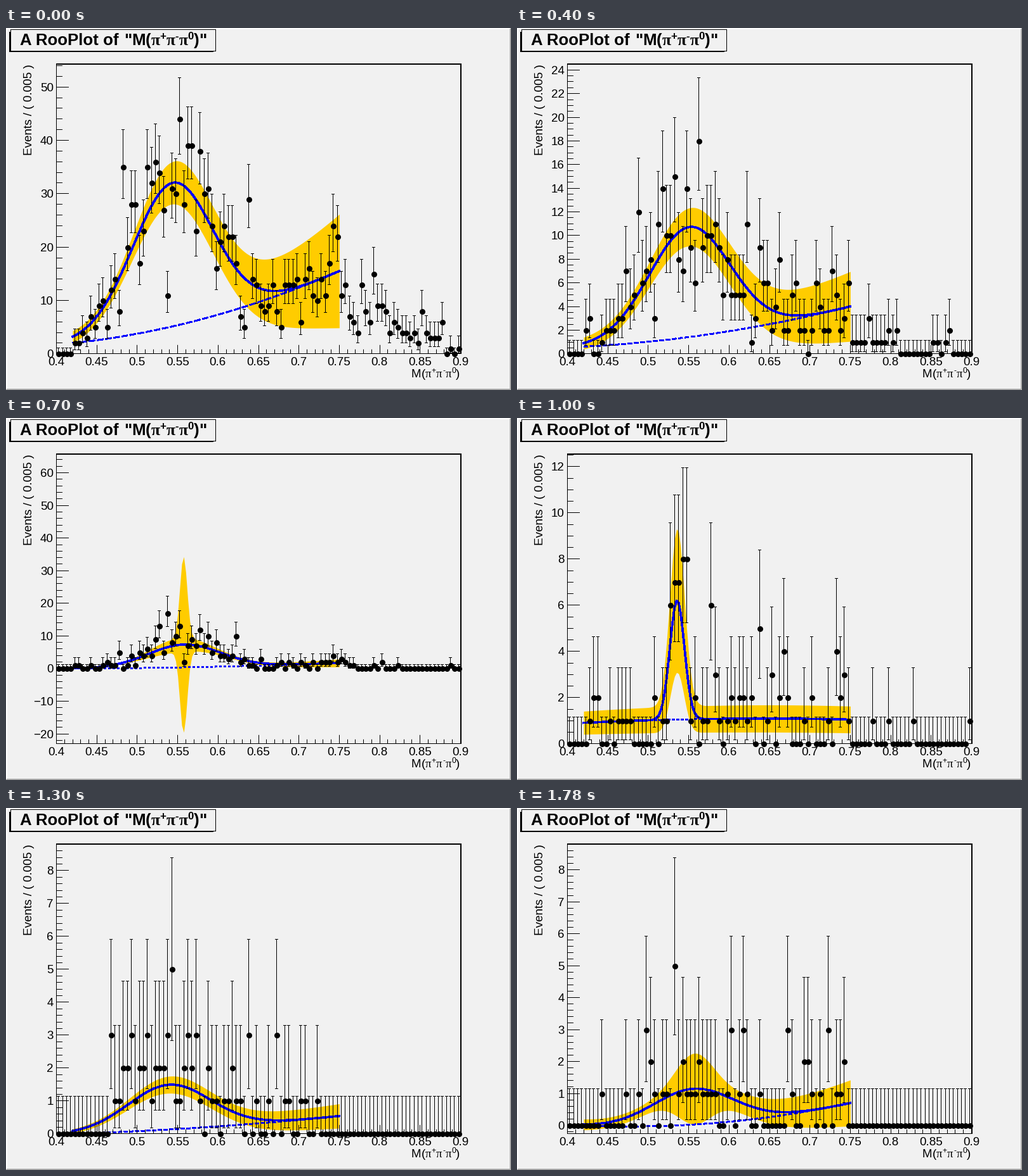
These frames come from a looping animation (796x572 px, 1900 ms). A matplotlib script:

```python
import math

import matplotlib.pyplot as plt
import numpy as np
from matplotlib.animation import FuncAnimation
from matplotlib.patches import Polygon, Rectangle

W, H = 796, 572
LEFT, RIGHT, TOP, BOTTOM = 79.6, 716.4, 57.2, 514.8
XMIN, XMAX, NBINS = 0.4, 0.9, 100
FIT_LO, FIT_HI = 0.42, 0.75
FIT = np.linspace(FIT_LO, FIT_HI, 133)
BINS = XMIN + (np.arange(NBINS) + 0.5) * (XMAX - XMIN) / NBINS
PAPER, BAND, BLUE = "#f1f1f1", "#ffcc00", "#0000ff"
LABEL = 18.7

plt.rcParams["font.family"] = "Liberation Sans"
plt.rcParams["lines.scale_dashes"] = False

fig = plt.figure(figsize=(W / 72, H / 72), dpi=72, facecolor=PAPER)
ax = fig.add_axes([0, 0, 1, 1])
ax.set(xlim=(0, W), ylim=(H, 0))
ax.axis("off")


def to_x(v):
    return LEFT + (np.asarray(v) - XMIN) / (XMAX - XMIN) * (RIGHT - LEFT)


def pixel(v):
    """Centre of the pixel that holds v."""
    return np.floor(v) + 0.5


def fill(points, color, **kw):
    ax.add_patch(Polygon(points, fc=color, lw=0, aa=False, **kw))


def box(x0, y0, x1, y1, color, **kw):
    ax.add_patch(Rectangle((x0, y0), x1 - x0, y1 - y0, fc=color, lw=0,
                           aa=False, **kw))


def vline(x, y0, y1, z=4):
    return ax.vlines(pixel(x), y0, y1, "k", lw=1, snap=False, zorder=z)


def hline(y, x0, x1, z=4):
    return ax.hlines(pixel(y), x0, x1, "k", lw=1, snap=False, zorder=z)


def formula(x, y, size, runs, weight="normal"):
    """Lay out (text, advance in em, raised) runs from left to right."""
    for text, advance, raised in runs:
        em = size * (0.65 if raised else 1)
        greek = text == "π"
        ax.text(x, y - (0.36 * size if raised else 0), text, size=em,
                weight=weight, va="baseline",
                family="Liberation Serif" if greek else "Liberation Sans")
        x += advance * em


MASS = [("M", 0.833, 0), ("(", 0.333, 0),
        ("π", 0.549, 0), ("+", 0.584, 1), ("π", 0.549, 0), ("-", 0.333, 1),
        ("π", 0.549, 0), ("0", 0.556, 1), (")", 0.333, 0)]


def draw_canvas():
    fill([(0, 0), (W, 0), (W - 2, 2), (2, 2), (2, H - 2), (0, H)], "white")
    fill([(W, H), (W, 0), (W - 2, 2), (W - 2, H - 2), (2, H - 2), (0, H)],
         "#a8a8a8")

    # title with its shadow to the lower left
    box(5, 6, 7, 38, "black")
    box(5, 36, 327, 38, "black")
    box(7, 2, 331, 37, "black")
    box(8, 3, 330, 36, PAPER)
    formula(22, 27, 25.9, [("A RooPlot of ", 6.333, 0), ('"', 0.474, 0),
                           *MASS, ('"', 0.474, 0)], "bold")

    # frame and x axis
    box(79, 56, 718, 58, "black", zorder=4)
    box(716, 56, 718, 515, "black", zorder=4)
    box(79, 56, 80, 515, "black", zorder=4)
    box(79, 514, 717, 515, "black", zorder=4)
    for i in range(51):
        value = XMIN + i / 100
        vline(to_x(value), BOTTOM - (7 if i % 5 else 14), BOTTOM)
        if i % 5 == 0:
            ax.text(to_x(value) - 0.5, 533, f"{value:.2f}".rstrip("0"),
                    size=LABEL, ha="center", va="baseline")

    formula(638.8, 551.5, LABEL, MASS)
    ax.text(41, 57, "Events / ( 0.005 )", size=LABEL + 0.2, rotation=90,
            rotation_mode="anchor", ha="right", va="baseline")


def poisson_mean(n, p):
    """Mean for which a Poisson variable is at most n with probability p."""
    lo, hi = 0.0, n + 5 * math.sqrt(n + 1) + 5
    for _ in range(40):
        m = (lo + hi) / 2
        cdf = math.exp(-m) * sum(m**k / math.factorial(k)
                                 for k in range(n + 1))
        lo, hi = (m, hi) if cdf > p else (lo, m)
    return lo


def interval(n):
    """Central 68% range of the mean, given n events."""
    if n == 0:
        return 0, 1.148
    return poisson_mean(n - 1, 0.8413), poisson_mean(n, 0.1587)


def parabola(x, start, middle, end):
    """Quadratic through the ends and the middle of the fit range."""
    t = (x - FIT_LO) / (FIT_HI - FIT_LO)
    return (start * (1 - t) * (1 - 2 * t) + 4 * middle * t * (1 - t)
            + end * t * (2 * t - 1))


def gauss(x, height, mean, width):
    return height * np.exp(-((x - mean) / width)**2 / 2)


def sample(seed, expected, tail, spikes):
    """Poisson counts around the fit, fading above it, with set outliers."""
    mean = np.where(BINS < FIT_HI, expected,
                    tail * np.exp((FIT_HI - BINS) / 0.07))
    mean[BINS < FIT_LO] = 0
    counts = np.random.RandomState(seed).poisson(np.maximum(mean, 0))
    counts = np.minimum(counts, max(spikes.values()))
    for b, n in spikes.items():
        counts[b] = n
    return counts


pages = []


def add_page(major, parts, bkg, peak, band, bumps, tail, spikes, dash,
             lo=0, hi=None):
    def model(x):
        return parabola(x, *bkg) + gauss(x, *peak)

    def to_y(v):
        return BOTTOM - (np.asarray(v) - lo) / (hi - lo) * (BOTTOM - TOP)

    counts = sample(len(pages) + 1, model(BINS), tail, spikes)
    spans = {n: interval(n) for n in set(counts.tolist())}
    hi = hi or 1.05 * spans[counts.max()][1]
    art = []

    step = major / parts
    for i in range(math.ceil(lo / step), math.floor(hi / step) + 1):
        y = to_y(i * step)
        art.append(hline(y, 79, 79 + (10 if i % parts else 20)))
        if i % parts == 0:
            label = str(i // parts * major).replace("-", "\u2212")
            art.append(ax.text(74.8, y + 6.5, label, size=LABEL, ha="right",
                               va="baseline"))

    px, total = to_x(FIT), model(FIT)
    half = parabola(FIT, *band) + sum(gauss(FIT, *b) for b in bumps)
    art.append(ax.fill_between(px, to_y(total - half), to_y(total + half),
                               color=BAND, lw=0, aa=False, zorder=2))
    art += ax.plot(px, to_y(parabola(FIT, *bkg)), color=BLUE, lw=2.2,
                   aa=False, zorder=3, ls=(0, (dash, 3)),
                   dash_capstyle="butt")
    art += ax.plot(px, to_y(total), color=BLUE, lw=2.7, aa=False, zorder=3)

    x = pixel(to_x(BINS))
    low, high = pixel(to_y([spans[n] for n in counts.tolist()])).T
    art.append(vline(x, low, high, 5))
    for end in (low, high):
        art.append(hline(end, x - 2.5, x + 2.5, 5))
    art += ax.plot(x, pixel(to_y(counts)), "o", color="k", ms=9, mew=0,
                   zorder=6)
    pages.append(art)


draw_canvas()

# Parabolas: start, middle, end.  Peaks and bumps: height, mean, width.
# Spikes: bin -> count.
add_page(10, 5, bkg=(2, 6.7, 15.5), peak=(26.9, 0.5437, 0.0495),
         band=(1.1, 3.0, 10.65), bumps=[(2, 0.545, 0.045)],
         tail=13, spikes={16: 35, 27: 11, 30: 44, 47: 29}, dash=9)

add_page(5, 5, bkg=(2.75, 5.6, 10.55), peak=(15.7, 0.5352, 0.038),
         band=(1.8, 3.3, 7.5), bumps=[(2.9, 0.536, 0.03)],
         tail=5, spikes={20: 21, 24: 27, 26: 27, 42: 16}, dash=9)

add_page(2, 4, bkg=(0.6, 1.75, 4), peak=(9.3, 0.551, 0.05),
         band=(0.5, 1.4, 2.95), bumps=[(0.45, 0.552, 0.04)],
         tail=2, spikes={17: 12, 26: 15, 32: 18, 44: 11}, dash=6)

add_page(10, 5, bkg=(0, 0.5, 1.7), peak=(7, 0.5585, 0.045),
         band=(0, 0.2, 1.2), bumps=[(2, 0.55, 0.035), (25, 0.557, 0.0045)],
         tail=1, spikes={25: 13, 27: 17, 35: 12, 37: 10}, dash=3,
         lo=-23.06, hi=65.7)

add_page(2, 4, bkg=(0.91, 1.08, 1.05), peak=(5.16, 0.5357, 0.009),
         band=(0.5, 0.58, 0.58), bumps=[(2.55, 0.5357, 0.0095)],
         tail=0.2, spikes={25: 6, 28: 8, 35: 6, 47: 5}, dash=3)

add_page(1, 5, bkg=(0, 0.2, 0.54), peak=(1.36, 0.5396, 0.051),
         band=(0.06, 0.2, 0.37), bumps=[(0.1, 0.54, 0.04)],
         tail=0.05, spikes={13: 3, 28: 5, 47: 3, 54: 3}, dash=5)

add_page(1, 5, bkg=(0, 0.08, 0.7), peak=(1.12, 0.556, 0.05),
         band=(0.17, 0.25, 0.72), bumps=[(0.9, 0.557, 0.022)],
         tail=0.05, spikes={19: 3, 26: 5, 54: 3, 64: 3}, dash=5, lo=-0.263)


def update(k):
    # the first page stays one tick, every other page three
    current = (k + 2) // 3
    for i, art in enumerate(pages):
        for a in art:
            a.set_visible(i == current)
    return []


anim = FuncAnimation(fig, update, frames=19, interval=100, repeat=True,
                     repeat_delay=0, blit=False)
plt.show()
```
